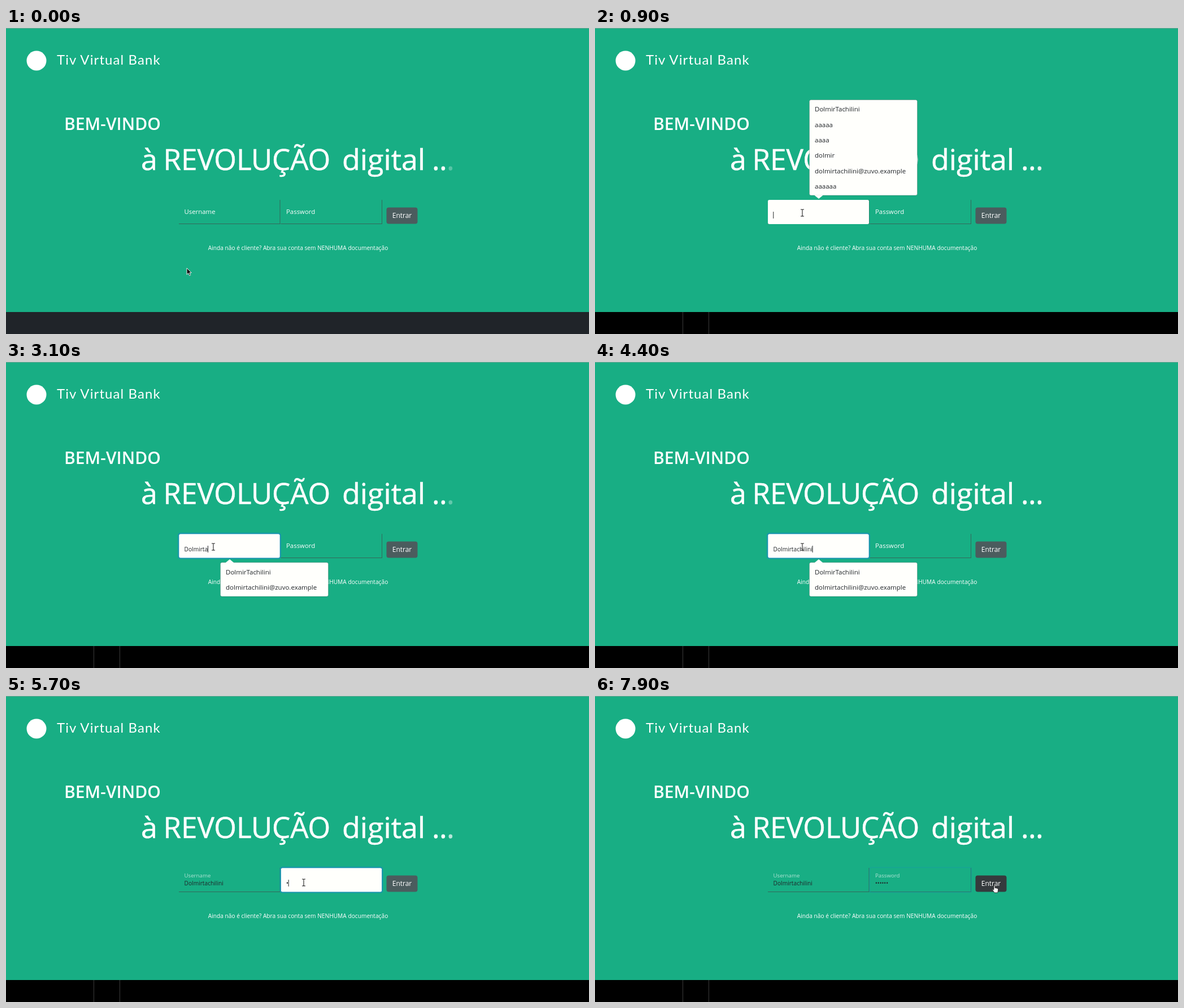
Write an HTML page that moves like this. It is 1032x543 px and loops after 8 s.

```html
<!DOCTYPE html>
<html lang="pt-BR">
<head>
<meta charset="utf-8">
<title>Login</title>
<style>
html, body { margin: 0; width: 100%; height: 100%; overflow: hidden; background: #18ae84; }
svg { display: block; width: 100vw; height: 100vh; }
text { font-family: "Open Sans", "Noto Sans", sans-serif; fill: #fff; white-space: pre; }
.brand { font: 24px Lato, sans-serif; letter-spacing: 1.1px; }
.dark, .item { fill: #212529; }
.typed { font-size: 10.2px; }
.item { font-size: 11.5px; }
.white { fill: #fffffc; }
.edge { fill: none; stroke: #35685b; }
</style>
</head>
<body>
<svg id="stage" viewBox="0 0 1032 543" preserveAspectRatio="none">
  <rect width="1032" height="543" fill="#18ae84"/>
  <rect width="1032" height="1" fill="#6fa595"/>
  <rect id="foot" y="504" width="1032" height="39"/>
  <path id="rules" d="M155.500 504V543M201.500 504V543" stroke="#3a3a3a"/>

  <circle cx="54" cy="58" r="17.500" fill="#fff"/>
  <text class="brand" x="90" y="64.500">Tiv Virtual Bank</text>
  <text x="103" y="181" font-size="30" font-weight="600">BEM-VINDO</text>
  <g font-size="52" stroke="#fff" stroke-width=".6">
    <text x="239" y="252">à</text>
    <text x="278.500" y="252" font-size="51">REVOLUÇÃO</text>
    <text x="595" y="252">digital</text>
    <g text-anchor="middle">
      <text x="761" y="252">.</text>
      <text x="774" y="252">.</text>
      <text id="dot" x="787" y="252">.</text>
    </g>
  </g>
  <text x="517" y="393.500" font-size="10.200" text-anchor="middle">Ainda não é cliente? Abra sua conta sem NENHUMA documentação</text>

  <g id="fields"></g>

  <rect id="button" x="673.500" y="318.500" width="55" height="29" rx="4"/>
  <text x="701" y="337.300" font-size="12" text-anchor="middle">Entrar</text>

  <g id="popup">
    <rect id="sheet" class="white" x="379.500" width="191" rx="3" stroke="#000" stroke-opacity=".2"/>
    <path id="tip" class="white"/>
    <g id="items"></g>
  </g>

  <g id="mouse">
    <path id="arrow" d="M0 0V11.500L2.700 9L4.700 13.300L6.700 12.400L4.800 8.300H8.300Z" fill="#111" stroke="#fff" stroke-width=".9"/>
    <path id="beam" d="M-3 -6H-.8L0 -5.300L.8 -6H3M0 -5.300V5.300M-3 6H-.8L0 5.300L.8 6H3" fill="none" stroke="#222" stroke-width="1.100"/>
    <path id="hand" d="M-2 -5.500Q-1 -7 0 -5.500V-1.500L4 -.8Q6 -.3 5.700 2L4.800 7H-1L-4.300 2Q-4.500 .3 -2 1.800Z" fill="#fff" stroke="#222" stroke-width=".8"/>
  </g>
</svg>
<script>
const LOOP = 8000, STEP = 100;
const NS = 'http://www.w3.org/2000/svg';
const $ = id => document.getElementById(id);

function add(parent, tag, attrs, label) {
  const el = document.createElementNS(NS, tag);
  for (const k in attrs) el.setAttribute(k, attrs[k]);
  if (label) el.textContent = label;
  parent.appendChild(el);
  return el;
}
function set(el, attrs) {
  for (const k in attrs) el.setAttribute(k, attrs[k]);
}
const show = (el, on) => el.setAttribute('visibility', on ? 'visible' : 'hidden');
const clamp = v => Math.max(0, Math.min(1, v));
const ease = v => { v = clamp(v); return v * v * (3 - 2 * v); };

const user = {
  x: 306, label: 'Username', value: 'Dolmirtachilini', focus: 800, blur: 5000, ringAt: 900,
  keys: [1900, 2100, 2200, 2400, 2500, 2700, 2900, 3100, 3200, 3400, 3500, 3700, 3900, 4000, 4200]
};
const pass = {
  x: 486.5, label: 'Password', value: '••••••', focus: 5000, blur: 7800, ringAt: 5000,
  keys: [5600, 5800, 6000, 6100, 6300, 6900]
};
const fields = [user, pass];

const entries = ['DolmirTachilini', 'aaaaa', 'aaaa', 'dolmir', 'dolmirtachilini@zuvo.example', 'aaaaaa'];
const rows = entries.map(s => add($('items'), 'text', { x: 389, class: 'item' }, s));

// Resting points of the pointer, with a bend for each move
const moves = [
  { from: 100, to: 600, a: [320, 426], b: [367, 328], bend: [352, 372] },
  { from: 4600, to: 4900, a: [366.5, 328], b: [527, 331], bend: [445, 331] },
  { from: 7200, to: 7600, a: [527, 331], b: [708, 342], bend: [615, 362] }
];

for (const f of fields) {
  const g = $('fields');
  f.line = add(g, 'path', { class: 'edge', d: `M${f.x} 347.5H${f.x + 179.5}M${f.x + 179} 305V348` });
  f.halo = add(g, 'rect', { x: f.x - .8, y: 304, width: 180.6, height: 44.5, rx: 3.5, fill: 'none', stroke: '#179ca4', 'stroke-width': 2.6 });
  f.box = add(g, 'rect', { class: 'white', x: f.x, y: 305, width: 179, height: 43, rx: 2.5 });
  f.rim = add(g, 'rect', { x: f.x - .2, y: 304.8, width: 179.4, height: 43.2, rx: 3, fill: 'none', stroke: '#1a90b4' });
  f.name = add(g, 'text', { x: f.x + 9.5 }, f.label);
  f.text = add(g, 'text', { class: 'typed dark', x: f.x + 9.5, y: 335.5 });
  f.caret = add(g, 'rect', { class: 'dark', y: 326, width: 1, height: 12 });
}

function drawField(f, t) {
  const count = f.keys.filter(k => k <= t).length;
  const active = t >= f.focus && t < f.blur;
  const ring = t < f.blur ? clamp((t - f.ringAt) / 150) : 1 - clamp((t - f.blur) / 130);
  const last = count ? f.keys[count - 1] : f.focus;
  const small = count > 0;

  f.text.textContent = f.value.slice(0, count);
  show(f.box, active);
  set(f.halo, { opacity: ring });
  set(f.rim, { opacity: ring });
  show(f.name, !active);
  set(f.name, { y: small ? 321.7 : 330.3, 'font-size': small ? 9.7 : 11.4, opacity: small ? .65 : 1 });
  show(f.caret, active && (t - last) % 1200 < 600);
  const w = count ? f.text.getComputedTextLength() : 0;
  set(f.caret, { x: f.x + 9.3 + w });
}

function drawPopup(t) {
  const open = t >= 800 && t < 4600;
  show($('popup'), open);
  const above = t < user.keys[0];
  const picks = above ? [0, 1, 2, 3, 4, 5] : t < user.keys[6] ? [0, 3, 4] : [0, 4];
  const top = above ? 127.5 : 355.8;
  set($('sheet'), { y: top, height: picks.length * 27.3 + 5.6 });
  set($('tip'), { d: above ? 'M388 296.5H404L396 303Z' : 'M388 356.8H404L396 350Z' });
  rows.forEach((row, i) => {
    const n = picks.indexOf(i);
    show(row, open && n >= 0);
    set(row, { y: top + 20.8 + n * 27.3 });
  });
}

function pointer(t) {
  const m = moves.filter(v => t >= v.from).pop() || moves[0];
  const k = ease((t - m.from) / (m.to - m.from));
  return [0, 1].map(i =>
    (1 - k) ** 2 * m.a[i] + 2 * k * (1 - k) * m.bend[i] + k * k * m.b[i]);
}

function drawMouse(t) {
  const [x, y] = pointer(t);
  const inRow = y > 305 && y < 348;
  const onField = inRow && x > 306 && x < 666;
  const onButton = x > 674 && x < 728 && y > 319 && y < 347;
  set($('mouse'), { transform: `translate(${x} ${y})` });
  show($('beam'), onField);
  show($('hand'), onButton);
  show($('arrow'), !onField && !onButton);
  set($('button'), { fill: onButton ? '#353a3d' : '#4b5c5e' });
}

function draw(now) {
  const t = Math.floor(now % LOOP / STEP) * STEP;
  set($('foot'), { fill: t < 100 ? '#202429' : '#000' });
  show($('rules'), t >= 100);
  set($('dot'), { opacity: .575 + .425 * Math.cos((t - 670) / 1800 * 2 * Math.PI) });
  fields.forEach(f => drawField(f, t));
  drawPopup(t);
  drawMouse(t);
}

function tick() {
  draw(performance.now());
  requestAnimationFrame(tick);
}
tick();
</script>
</body>
</html>
```
